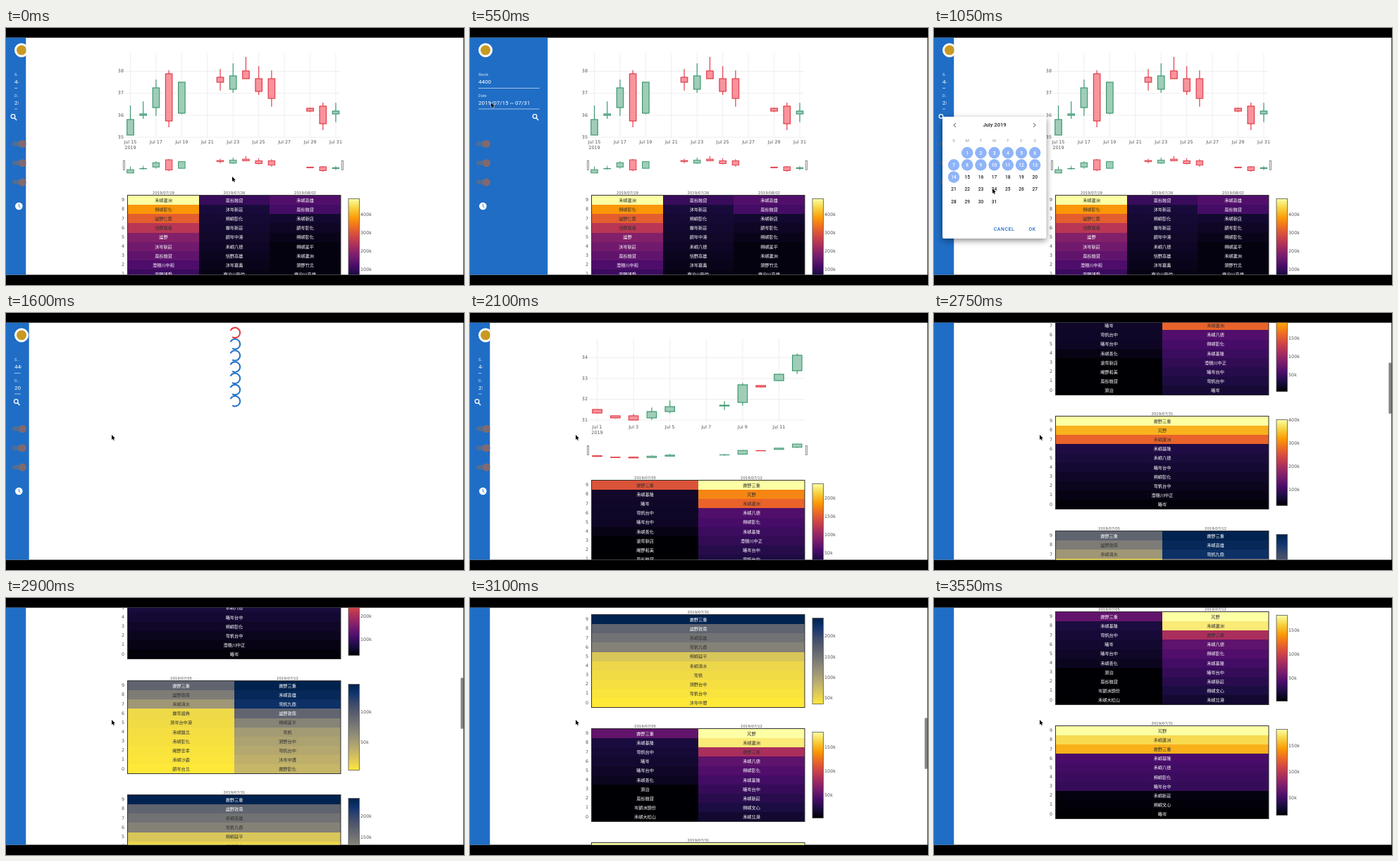
An HTML page with a canvas for the animation above (3.65 s loop, 650x365 px).

```html
<!DOCTYPE html>
<html lang="zh-Hant">
<head>
<meta charset="utf-8">
<style>
html, body { margin: 0; width: 100%; height: 100%; overflow: hidden; background: #000; }
canvas { display: block; }
</style>
</head>
<body>
<canvas id="stage" width="650" height="365"></canvas>
<script>
const ctx = document.getElementById('stage').getContext('2d');
const LOOP = 3650, STEP = 50, ROW = 13.15;
const PLOT = '"DejaVu Sans", sans-serif', UI = 'Roboto, sans-serif';
const CJK = '"Noto Sans CJK TC", "Noto Sans CJK", sans-serif';
const INFERNO = ['000004', '1b0c41', '4a0c6b', '781c6d', 'a52c60', 'cf4446', 'ed6925', 'fb9b06', 'f7d13d', 'fcffa4'];
const CIVIDIS = ['fee838', 'e1cc55', 'c3b369', 'a59c74', '8a8678', '707173', '575d6d', '3b496c', '123570', '00224e'];

const clamp = (v, lo = 0, hi = 1) => Math.min(hi, Math.max(lo, v));

// Linear interpolation between [position, ...values] key points
function at(keys, t) {
  if (t <= keys[0][0]) return keys[0].slice(1);
  const i = keys.findIndex(k => k[0] > t);
  if (i < 0) return keys[keys.length - 1].slice(1);
  const a = keys[i - 1], b = keys[i], p = (t - a[0]) / (b[0] - a[0]);
  return a.slice(1).map((v, j) => v + (b[j + 1] - v) * p);
}

// One [open, close] height per weekday; July 2019 starts on a Monday
const lateJuly = {
  first: 15, x: 176.5, dx: 18.22, price: 38, priceY: 61.5, priceGap: 31.2, wick: 1,
  bodies: [[152, 130], [124, 122], [113, 85], [65, 132], [121, 77], [70, 77], [87, 68],
    [61, 72], [72, 90], [72, 100], [114, 118], [111, 136], [122, 118]]
};
const earlyJuly = {
  first: 1, x: 180.5, dx: 25.8, price: 34, priceY: 63.5, priceGap: 29.5, wick: .5,
  bodies: [[137, 142], [146, 149], [146, 152], [149, 140], [140, 133], [132, 131], [127, 102],
    [103, 105], [96, 87], [82, 60]]
};

// profile: [row, intensity] key points; ticks: maximum and step in thousands, pixels per step
const column = (date, profile, names) => ({ date: '2019/' + date, profile, names: names.split(' ') });
const heatmap = (scale, ticks, ...columns) => ({ scale, ticks, columns });

const lateMaps = [heatmap(INFERNO, [485, 100, 26.3],
  column('07/19', [[0, 1], [1, .77], [4, .36], [8, .19]],
    '禾嶼蘆洲 朔嶼彰化 謐野仁愛 恬野嘉義 謐野 沐岑新莊 嵐谷融貸 澄穗川中和 穹野博愛'),
  column('07/26', [[0, .18], [1, .1], [8, .03]],
    '嵐谷融貸 沐岑新莊 朔嶼彰化 霧岑新莊 朗岑中港 禾嶼八德 恬野高雄 沐岑嘉義 霧泊川新竹'),
  column('08/02', [[0, .24], [1, .21], [2, .08], [5, .02]],
    '禾嶼高雄 嵐谷融貸 禾嶼新店 朗岑彰化 朔嶼彰化 朔嶼延平 禾嶼蘆洲 漪野竹北 霧泊川高雄'))];

const earlyMaps = [
  heatmap(INFERNO, [241, 50, 25.8],
    column('07/05', [[0, .6], [1, .07], [4, .06], [6, 0]],
      '霽野三重 禾嶼基隆 曦岑 穹帆台中 曦岑台中 禾嶼善化 滄穹新店 晞野和美 嵐谷融貸 漪泊'),
    column('07/12', [[0, 1], [1, .73], [2, .65], [3, .24], [9, .09]],
      '霽野三重 芃野 禾嶼蘆洲 禾嶼八德 朔嶼彰化 禾嶼基隆 澄穗川中正 曦岑台中 穹帆台中 曦岑')),
  heatmap(INFERNO, [404, 100, 33],
    column('07/31', [[0, 1], [2, .65], [3, .12], [9, .01]],
      '霽野三重 芃野 禾嶼蘆洲 禾嶼基隆 禾嶼八德 曦岑台中 朔嶼彰化 穹帆台中 澄穗川中正 曦岑')),
  heatmap(CIVIDIS, [146, 50, 43],
    column('07/05', [[0, .63], [2, .36], [3, .06], [9, 0]],
      '霽野三重 謐野敦南 禾嶼清水 霧穹證券 漪岑台中港 禾嶼鎮北 禾嶼彰化 晞野忠孝 禾嶼沙鹿 朗岑台北'),
    column('07/12', [[0, 1], [2, .92], [3, .62], [4, .46], [5, .34], [9, .21]],
      '霽野三重 禾嶼高雄 穹帆九鼎 謐野敦南 朔嶼延平 穹帆 漪野台中 穹帆台中 沐岑中壢 霽野彰化')),
  heatmap(CIVIDIS, [245, 50, 29.2],
    column('07/31', [[0, 1], [1, .63], [3, .47], [4, .14], [5, .07], [9, 0]],
      '霽野三重 謐野敦南 禾嶼高雄 穹帆九鼎 朔嶼延平 禾嶼清水 穹帆 漪野台中 穹帆台中 沐岑中壢')),
  heatmap(INFERNO, [182, 50, 34],
    column('07/05', [[0, .28], [1, .11], [5, .05], [6, 0]],
      '霽野三重 禾嶼基隆 穹帆台中 曦岑 曦岑台中 禾嶼善化 漪泊 嵐谷融貸 岑朗洲頭份 禾嶼大松山'),
    column('07/12', [[0, 1], [1, .95], [2, .46], [3, .27], [9, .08]],
      '芃野 禾嶼蘆洲 霽野三重 禾嶼八德 朔嶼彰化 禾嶼基隆 曦岑台中 禾嶼新莊 朔嶼文心 禾嶼北港')),
  heatmap(INFERNO, [182, 50, 37],
    column('07/31', [[0, 1], [2, .82], [3, .22], [6, .17], [7, .02], [9, 0]],
      '芃野 禾嶼蘆洲 霽野三重 禾嶼基隆 禾嶼八德 朔嶼彰化 曦岑台中 禾嶼新莊 朔嶼文心 曦岑'))
];

const cursorPath = [[0, 321, 211], [500, 30, 106], [650, 30, 106], [750, 47, 178], [950, 29, 212],
  [1050, 83, 228], [1150, 139, 286], [1400, 94, 127], [1450, 94, 127], [1600, 150, 173]];
const scrollAt = t => clamp((t - 2552) * 1.28, 0, 867);

// The drawer opens while hovered, easing out both ways
const eased = (t, start) => 1 - (1 - clamp((t - start) / 160)) ** 3;
const drawerAt = t => 28.5 + 82 * (eased(t, 300) - eased(t, 600) + eased(t, 1250) - eased(t, 1500));

function shade(scale, v) {
  const i = Math.min(8, Math.floor(v * 9)), p = v * 9 - i;
  const channel = (hex, k) => parseInt(hex.slice(k, k + 2), 16);
  return `rgb(${[0, 2, 4].map(k => channel(scale[i], k) * (1 - p) + channel(scale[i + 1], k) * p)})`;
}

function text(s, x, y, font, color, align = 'center') {
  ctx.font = font;
  ctx.fillStyle = color;
  ctx.textAlign = align;
  ctx.textBaseline = 'middle';
  ctx.fillText(s, x, y);
}

const label = (s, x, y, align) => text(s, x, y, '6.4px ' + PLOT, '#555', align);

function rect(x, y, w, h, color) {
  ctx.fillStyle = color;
  ctx.fillRect(x, y, w, h);
}

function frame(x, y, w, h, color, width) {
  ctx.strokeStyle = color;
  ctx.lineWidth = width;
  ctx.strokeRect(x, y, w, h);
}

function pill(x, y, w, h, r, color) {
  ctx.fillStyle = color;
  ctx.beginPath();
  ctx.roundRect(x, y, w, h, r);
  ctx.fill();
}

const disc = (x, y, r, color) => pill(x - r, y - r, 2 * r, 2 * r, r, color);

function arc(x, y, r, from, to, color, width) {
  ctx.strokeStyle = color;
  ctx.lineWidth = width;
  ctx.beginPath();
  ctx.arc(x, y, r, from, to);
  ctx.stroke();
}

function line(color, width, ...points) {
  ctx.strokeStyle = color;
  ctx.lineWidth = width;
  ctx.beginPath();
  points.forEach(p => ctx.lineTo(...p));
  ctx.stroke();
}

function drawCandles(chart, toY, lineWidth) {
  chart.bodies.forEach(([open, close], i) => {
    const offset = i + 2 * Math.floor(i / 5), phase = Math.PI * (chart.first + offset - 15) / 9;
    const x = chart.x + offset * chart.dx, w = chart.dx * .52;
    const top = Math.min(open, close), bottom = Math.max(open, close), up = close < open;
    const high = top - 20 * chart.wick * Math.cos(phase) ** 2;
    const low = Math.min(152, bottom + 12 * chart.wick * Math.sin(2 * phase) ** 2);
    const color = up ? '#3d9970' : '#e03c46';
    line(color, lineWidth, [x, toY(high)], [x, toY(top)]);
    line(color, lineWidth, [x, toY(bottom)], [x, toY(low)]);
    const box = [x - w / 2, toY(top), w, toY(bottom) - toY(top)];
    rect(...box, up ? '#9fcdb8' : '#f8949e');
    frame(...box, color, lineWidth);
  });
}

function drawChart(chart) {
  for (let i = 0; i < 4; i++) {
    const y = chart.priceY + i * chart.priceGap;
    line('#eee', 1, [169, y], [475, y]);
    label(chart.price - i, 167, y, 'right');
  }
  for (let day = chart.first, x = chart.x; x < 475; day += 2, x += 2 * chart.dx) {
    line('#eee', 1, [x, 36], [x, 155]);
    label('Jul ' + day, x, 162.5);
  }
  label('2019', chart.x, 170.5);
  drawCandles(chart, y => y, 1.2);
  drawCandles(chart, y => 173.1 + .216 * y, 1);
  for (const x of [166.5, 476.5]) {
    rect(x, 188.5, 2, 13, '#fff');
    frame(x, 188.5, 2, 13, '#777', .8);
  }
}

function drawHeatmap({ scale, ticks, columns }, index) {
  const top = Math.round(238 + index * 162.25);
  const rowY = i => Math.round(top + i * ROW);
  const colX = i => Math.round(173 + 302 * i / columns.length);
  columns.forEach((col, c) => {
    const x = colX(c), w = colX(c + 1) - x, mid = x + w / 2;
    text(col.date, mid, top - 3.7, '5.4px ' + PLOT, '#555');
    col.names.forEach((name, r) => {
      const [v] = at(col.profile, r);
      const dark = scale === INFERNO ? v > .4 : v < .6;
      rect(x, rowY(r), w, rowY(r + 1) - rowY(r), shade(scale, v));
      text(name, mid, top + 6.5 + r * ROW, '6.2px ' + CJK, dark ? '#333' : '#fff');
    });
  });
  frame(172.5, top - .5, 302.5, 10 * ROW + .5, '#333', 1);
  for (let r = 0; r < 10; r++) label(9 - r, 168, top + 6.6 + r * ROW, 'right');

  const barTop = top + 4.5, bar = ctx.createLinearGradient(0, barTop + 122, 0, barTop);
  scale.forEach((c, i) => bar.addColorStop(i / 9, '#' + c));
  rect(486, barTop, 15.5, 122, bar);
  frame(486, barTop, 15.5, 122, '#555', .8);
  const [max, step, gap] = ticks;
  for (let k = Math.floor(max / step) * step; k > 0; k -= step) {
    label(k + 'k', 503, barTop + (max - k) / step * gap, 'left');
  }
}

function drawSpinners(t) {
  const turn = Math.PI + (t - 1600) / 1400 * 2 * Math.PI;
  for (let i = 0; i < 7; i++) {
    arc(325, 28 + i * 16.2, 7.2, turn + .45, turn + 5.28, i ? '#2070c4' : '#e5393f', 2);
  }
}

function drawField(name, value, y, width) {
  ctx.save();
  ctx.beginPath();
  ctx.rect(12, y - 6, width - 23, 30);
  ctx.clip();
  text(width < 45 ? name[0] + '...' : name, 12, y, '5.6px ' + UI, '#dbe8f8', 'left');
  text(value, 12, y + 10.5, '8px ' + UI, '#fff', 'left');
  ctx.restore();
  line('#dbe8f8', .7, [12, y + 19], [width - 12, y + 19]);
}

function drawDrawer(width, scroll, dates) {
  ctx.save();
  ctx.beginPath();
  ctx.rect(0, 13, width, 339);
  ctx.clip();
  rect(0, 13, width, 339, '#1f6dc5');
  ctx.translate(0, -scroll);
  disc(22, 31.5, 10, '#fff');
  disc(22, 31.5, 7, '#c79a22');
  drawField('Stock', '4400', 66.5, width);
  drawField('Date', dates, 96, width);
  const x = width - 18.5;
  arc(x, 125.5, 2.8, 0, 7, '#fff', 1.3);
  line('#fff', 1.5, [x + 2, 127.5], [x + 5, 131]);
  for (let i = 0; i < 3; i++) {
    const y = 164.5 + i * 27.3;
    pill(9, y - 3.2, 18, 6.4, 3.2, '#536d91');
    disc(23.3, y, 5.6, '#80696f');
  }
  disc(18.3, 253, 5.3, '#fff');
  line('#1f6dc5', .9, [18.3, 250], [18.3, 253.3], [20.5, 254.8]);
  ctx.restore();
}

function drawCalendar(from, to) {
  ctx.save();
  ctx.shadowColor = 'rgba(0,0,0,.45)';
  ctx.shadowBlur = 9;
  ctx.shadowOffsetY = 3;
  pill(12, 126, 147.5, 173, 2, '#fff');
  ctx.restore();
  text('July 2019', 86, 138, '500 7.6px ' + UI, '#222');
  line('#555', 1, [31, 135], [28, 138], [31, 141]);
  line('#555', 1, [141, 135], [144, 138], [141, 141]);
  const colX = i => 28 + i * 19.2;
  [...'SMTWTFS'].forEach((d, i) => text(d, colX(i), 160, '6.2px ' + UI, '#999'));
  for (let day = 1; day <= 31; day++) {
    const x = colX(day % 7), y = 177.3 + Math.floor(day / 7) * 17.25;
    const selected = day >= from && day <= to;
    if (selected) disc(x, y, 8.2, '#8fb4f8');
    text(day, x, y + .3, '500 6.6px ' + UI, selected ? '#fff' : '#222');
  }
  ctx.letterSpacing = '0.6px';
  text('CANCEL', 99.5, 286.3, '500 6.8px ' + UI, '#1f6dc5');
  text('OK', 139.5, 286.3, '500 6.8px ' + UI, '#1f6dc5');
  ctx.letterSpacing = '0px';
}

function drawCursor(x, y) {
  const arrow = new Path2D('M0 0V7L1.6 5.6 2.7 8 3.8 7.5 2.8 5.2 4.8 5Z');
  ctx.translate(x, y);
  ctx.strokeStyle = '#fff';
  ctx.lineWidth = 1;
  ctx.stroke(arrow);
  ctx.fillStyle = '#000';
  ctx.fill(arrow);
}

function draw(t) {
  const scroll = Math.round(scrollAt(t));
  const loaded = t >= 2100, loading = t >= 1500 && !loaded;
  rect(0, 0, 650, 365, '#000');
  ctx.save();
  ctx.beginPath();
  ctx.rect(0, 13.7, 649.3, 336.7);
  ctx.clip();
  rect(0, 13, 650, 339, '#fff');
  if (loading) drawSpinners(t);
  else {
    ctx.save();
    ctx.translate(0, -scroll);
    drawChart(loaded ? earlyJuly : lateJuly);
    (loaded ? earlyMaps : lateMaps).forEach(drawHeatmap);
    ctx.restore();
  }
  drawDrawer(drawerAt(t), scroll, t < 950 ? '2019/07/15 ~ 07/31' : '2019/07/01 ~ 07/14');
  if (t >= 600 && t < 750) drawCalendar(15, 31);
  if (t >= 750 && t < 1200) drawCalendar(1, t < 950 ? 1 : 14);
  if (scroll && t < 3400) pill(645.3, 14 + scroll * .2227, 3.7, 73, 1.8, '#858585');
  drawCursor(...at(cursorPath, t));
  ctx.restore();
}

function tick(now) {
  draw(Math.floor(now % LOOP / STEP) * STEP);
  requestAnimationFrame(tick);
}
requestAnimationFrame(tick);
</script>
</body>
</html>
```
